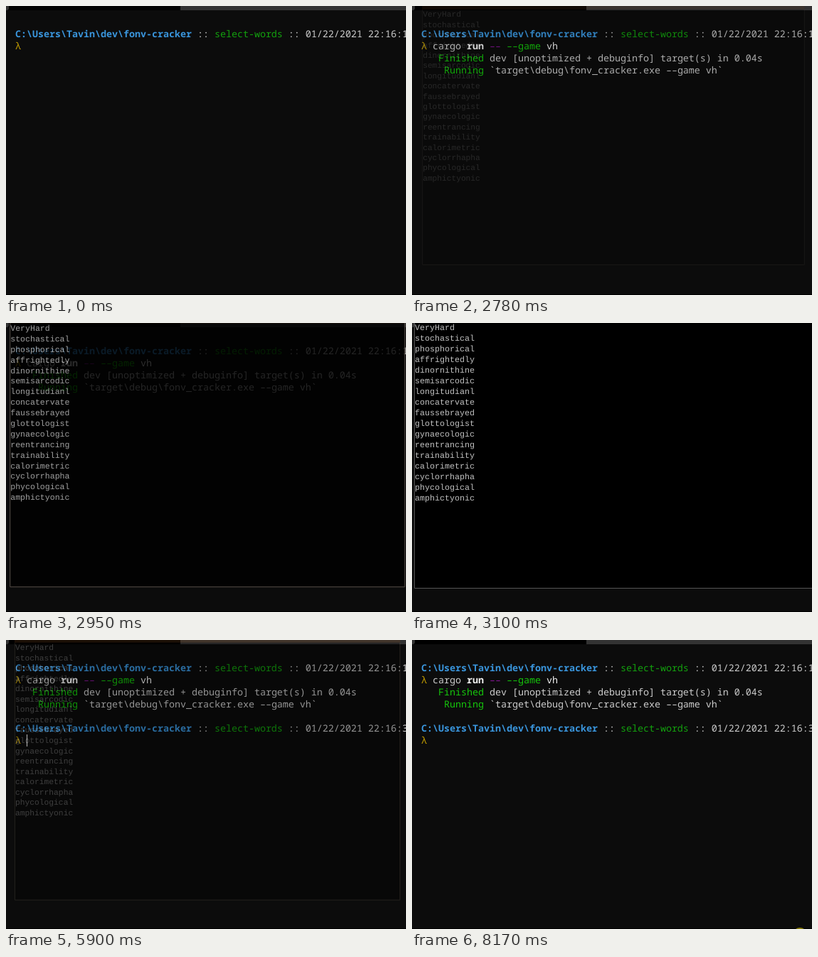
These frames come from a looping animation (562 by 407 pixels, 8.24 s). An HTML page:

```html
<!DOCTYPE html>
<html lang="en">
<head>
<meta charset="utf-8">
<title>Terminal session</title>
<style>
  html, body { margin: 0; width: 100%; height: 100%; overflow: hidden; background: #0c0c0c; }
  svg { display: block; width: 562px; height: 407px; }
  text { white-space: pre; text-rendering: geometricPrecision; }
  .shell { font: 500 13.3333px "Noto Sans Mono", "DejaVu Sans Mono", monospace; font-variant-ligatures: none; }
  .words { font: 11.6667px "Liberation Mono", "Courier New", monospace; fill: #c0c0c0; }
</style>
</head>
<body>
<svg id="stage" viewBox="0 0 562 407"></svg>
<script>
const LOOP = 8240;
const COL = 8, ROW = 17, LEFT = 5, TOP = 31;
const C = {
  text: '#cccccc', bright: '#f2f2f2', path: '#3a96dd', branch: '#13a10e',
  ok: '#16c60c', lambda: '#c19c00', dash: '#881798'
};
const WORDS = ['VeryHard', 'stochastical', 'phosphorical', 'affrightedly', 'dinornithine',
  'semisarcodic', 'longitudianl', 'concatervate', 'faussebrayed', 'glottologist',
  'gynaecologic', 'reentrancing', 'trainability', 'calorimetric', 'cyclorrhapha',
  'phycological', 'amphictyonic'];

const stage = document.getElementById('stage');

function add(parent, tag, attrs, content) {
  const el = document.createElementNS('http://www.w3.org/2000/svg', tag);
  for (const key in attrs) el.setAttribute(key, attrs[key]);
  if (content) el.textContent = content;
  parent.append(el);
  return el;
}

const rect = (parent, x, y, width, height, fill) =>
  add(parent, 'rect', { x, y, width, height, fill });

// Each run is [text, colour, weight]; double hyphens join up like a ligature.
function shellLine(parent, col, row, ...runs) {
  const line = add(parent, 'text', { class: 'shell', x: LEFT + col * COL, y: TOP + row * ROW + 13 });
  for (const [text, fill, weight = 500] of runs)
    add(line, 'tspan', { fill, 'font-weight': weight }, text.replace(/--/g, '––'));
  return line;
}

function prompt(parent, row, time) {
  shellLine(parent, 1, row, ['C:\\Users\\Tavin\\dev\\fonv-cracker', C.path, 600], [' :: ', C.text],
    ['select-words', C.branch], [' :: ' + time, C.text]);
  shellLine(parent, 1, row + 1, ['λ', C.lambda]);
}

const show = (el, on) => el.setAttribute('visibility', on ? 'visible' : 'hidden');

// Terminal
rect(stage, 0, 0, 562, 407, '#0c0c0c');
rect(stage, 0, 0, 562, 6, '#333333');
rect(stage, 2, 0, 243, 6, '#000000');
add(stage, 'path', { d: 'M0 0H4V3Q4 6 1 6H0Z', fill: '#333333' });
rect(stage, 0, 406, 562, 1, '#000000');

prompt(stage, 0, '01/22/2021 22:16:1');
const recalled = shellLine(stage, 3, 1, ['cls', C.text]);
const command = shellLine(stage, 3, 1, ['cargo ', C.text], ['run', C.bright, 600], [' ', C.text],
  ['--', C.dash], [' ', C.text], ['--game', C.ok], [' vh', C.bright]);

const output = add(stage, 'g', {});
shellLine(output, 4, 2, ['Finished', C.ok], [' dev [unoptimized + debuginfo] target(s) in 0.04s', C.text]);
shellLine(output, 5, 3, ['Running', C.ok], [' `target\\debug\\fonv_cracker.exe --game vh`', C.text]);

const nextPrompt = add(stage, 'g', {});
prompt(nextPrompt, 5, '01/22/2021 22:16:3');

const cursor = rect(stage, 0, 0, 1, ROW, '#ffffff');
const pointer = add(stage, 'circle', { cx: 545, cy: 415, r: 10, fill: '#8a7d08' });

// Game window
const game = add(stage, 'g', {});
rect(game, 3, -84, 560, 458, '#000000');
rect(game, 3, -84, 560, 83, '#6a3c18');
const border = add(game, 'path', { d: 'M3.5 -1V373.5H562.5V-1', fill: 'none' });
WORDS.forEach((word, i) => add(game, 'text', { class: 'words', x: 4, y: 10 + i * 15 }, word));

// [from, column, row]; a null column hides the cursor.
const CURSOR = [
  [0, null], [610, 3, 1], [1160, null], [1390, 6, 1], [1770, 25, 1], [2400, null],
  [2630, 0, 2], [2780, null], [5900, 3, 6], [6370, null], [6920, 3, 6],
  [7450, null], [8000, 3, 6], [8170, null]
];
// [from, opacity, scale, border]
const WINDOW = [
  [0, 0, 1, '#555555'],
  [2780, 0.15, 0.96, '#6a6058'], [2870, 0.52, 0.981, '#6a6058'], [2950, 0.82, 0.992, '#6a6058'],
  [3020, 0.96, 0.998, '#5c5854'], [3100, 1, 1, '#555555'], [5810, 1, 1, '#666666'],
  [5900, 0.27, 0.968, '#6a6050'], [5970, 0, 1, '#555555']
];
const current = (steps, t) => steps.findLast(step => step[0] <= t);

function render(t) {
  show(recalled, t >= 1390 && t < 1770);
  show(command, t >= 1770);
  show(output, t >= 2780);
  show(nextPrompt, t >= 5900);
  show(pointer, t >= 8170);

  const [, col, row] = current(CURSOR, t);
  show(cursor, col !== null);
  if (col !== null) {
    cursor.setAttribute('x', LEFT + col * COL);
    cursor.setAttribute('y', TOP + row * ROW);
  }

  const [, opacity, scale, edge] = current(WINDOW, t);
  show(game, opacity > 0);
  game.setAttribute('opacity', opacity);
  game.setAttribute('transform', `translate(283 145) scale(${scale}) translate(-283 -145)`);
  border.setAttribute('stroke', edge);
}

const start = performance.now();
function tick() {
  render((performance.now() - start) % LOOP);
  requestAnimationFrame(tick);
}
tick();
</script>
</body>
</html>
```
